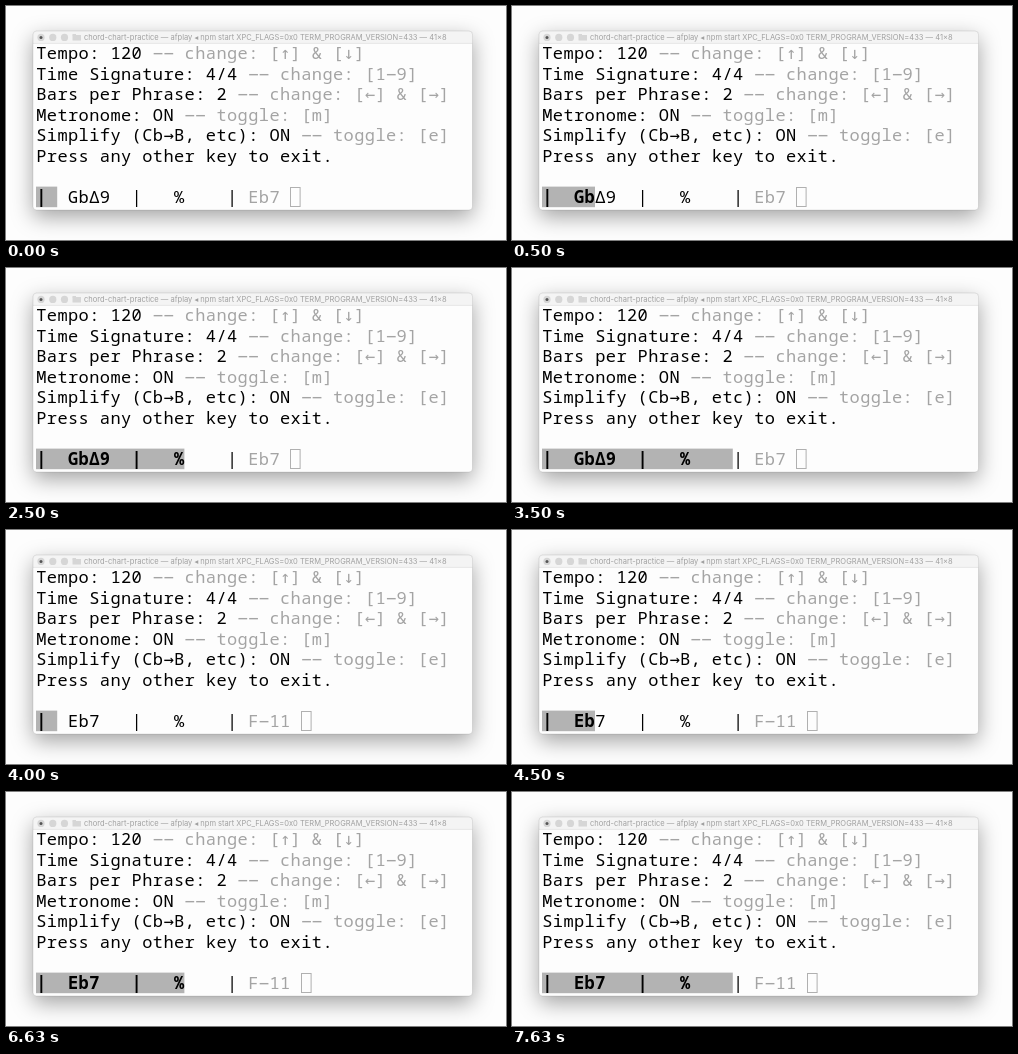
Recreate the animation shown at these times as an HTML page with a canvas. Size 500x234 px, loop 8000 ms.

```html
<!DOCTYPE html>
<html lang="en">
<head>
<meta charset="utf-8">
<title>Chord chart practice</title>
<style>
html, body { margin: 0; width: 100%; height: 100%; overflow: hidden; background: #fdfdfd; }
canvas { display: block; width: 500px; height: 234px; }
</style>
</head>
<body>
<canvas id="stage"></canvas>
<script>
const W = 500, H = 234, LOOP = 8000;
const canvas = document.getElementById('stage');
const ctx = canvas.getContext('2d');
const dpr = window.devicePixelRatio || 1;
canvas.width = W * dpr;
canvas.height = H * dpr;
ctx.scale(dpr, dpr);

const WIN = { x: 27, y: 25, w: 439.5, h: 179 };
const BAR_H = 12.5;
const CELL = 10.6, ROW = 20.6, LEFT = 30, BASE = 53;
const MONO = '17px "Noto Sans Mono", "DejaVu Sans Mono", monospace';
const WIDE = '17px "DejaVu Sans Mono", monospace';
const PAPER = '#fdfdfd', INK = '#000', DIM = '#a4a4a4', MARK = '#b3b3b3';

const menu = [
  ['Tempo: 120', 'change: [↑] & [↓]'],
  ['Time Signature: 4/4', 'change: [1-9]'],
  ['Bars per Phrase: 2', 'change: [←] & [→]'],
  ['Metronome: ON', 'toggle: [m]'],
  ['Simplify (Cb→B, etc): ON', 'toggle: [e]'],
  ['Press any other key to exit.', '']
];

// Each phrase: chord line, upcoming chord, and start time of each beat
const phrases = [
  { line: '|  GbΔ9  |   %    |', next: 'Eb7',
    beats: [0, 500, 1000, 1500, 2000, 2500, 3000, 3500] },
  { line: '|  Eb7   |   %    |', next: 'F-11',
    beats: [4000, 4500, 5000, 5500, 6000, 6630, 7130, 7630] }
];
const markEnds = [2, 5, 7, 9, 11, 14, 16, 18];

function roundBox(x, y, w, h, r) {
  ctx.beginPath();
  ctx.roundRect(x, y, w, h, r);
}

function dot(x, y, r, color) {
  ctx.beginPath();
  ctx.arc(x, y, r, 0, Math.PI * 2);
  ctx.fillStyle = color;
  ctx.fill();
}

// Draws text on the terminal grid, one character per cell;
// arrows and dashes use a font that fills the cell
function put(text, col, row, color, weight = 400) {
  ctx.textAlign = 'center';
  ctx.textBaseline = 'alphabetic';
  ctx.fillStyle = color;
  [...text].forEach((ch, i) => {
    if (ch === ' ') return;
    const wide = '-←↑→↓'.includes(ch);
    ctx.font = wide ? WIDE : weight + ' ' + MONO;
    ctx.fillText(ch === '-' ? '−' : ch, LEFT + (col + i + 0.5) * CELL, BASE + row * ROW);
  });
}

function drawWindow() {
  ctx.fillStyle = PAPER;
  ctx.fillRect(0, 0, W, H);

  ctx.save();
  ctx.shadowColor = 'rgba(0,0,0,0.36)';
  ctx.shadowBlur = 21 * dpr;
  ctx.shadowOffsetY = 7 * dpr;
  roundBox(WIN.x, WIN.y, WIN.w, WIN.h, 3.5);
  ctx.fill();
  ctx.restore();

  roundBox(WIN.x, WIN.y, WIN.w, BAR_H, [3.5, 3.5, 0, 0]);
  ctx.fillStyle = '#f4f4f4';
  ctx.fill();
  ctx.fillStyle = '#dcdcdc';
  ctx.fillRect(WIN.x, WIN.y + BAR_H - 0.6, WIN.w, 0.6);
  roundBox(WIN.x, WIN.y, WIN.w, WIN.h, 3.5);
  ctx.strokeStyle = 'rgba(0,0,0,0.16)';
  ctx.lineWidth = 0.6;
  ctx.stroke();

  for (const x of [35, 46.8, 58.5]) dot(x, 31.4, 3.6, '#d6d6d6');
  dot(35, 31.4, 1.5, '#555');

  // Folder
  ctx.fillStyle = '#d6d6d6';
  ctx.fillRect(66.5, 28, 3.5, 1.5);
  ctx.fillRect(66.5, 29, 8.5, 5.5);

  ctx.font = '7.54px Inter, "Open Sans", sans-serif';
  ctx.textAlign = 'left';
  ctx.textBaseline = 'alphabetic';
  ctx.fillStyle = '#a0a0a0';
  ctx.fillText('chord-chart-practice — afplay ◂ npm start XPC_FLAGS=0x0 TERM_PROGRAM_VERSION=433 — 41×8', 78, 34.3);
}

function drawMenu() {
  menu.forEach(([label, hint], row) => {
    put(label, 0, row, INK, 500);
    if (hint) put('-- ' + hint, label.length + 1, row, DIM, 500);
  });
}

function drawChart(t) {
  const { line, next, beats } = phrases[t < 4000 ? 0 : 1];
  const end = markEnds[beats.filter(b => b <= t).length - 1];
  const chars = [...line];

  ctx.fillStyle = MARK;
  ctx.fillRect(LEFT, 180.6, end * CELL, 20.6);
  put(chars.slice(0, end).join(''), 0, 7, INK, 700);
  put(chars.slice(end).join(''), end, 7, INK);
  put(next, 20, 7, DIM);

  const cursor = Math.floor(LEFT + (21 + next.length) * CELL) + 0.5;
  ctx.strokeStyle = '#b0b0b0';
  ctx.lineWidth = 1;
  ctx.strokeRect(cursor, 181.5, 9.6, 19);
}

const start = performance.now();

function frame(now) {
  const t = Math.max(0, now - start) % LOOP;
  drawWindow();
  drawMenu();
  drawChart(t);
  requestAnimationFrame(frame);
}

frame(start);
</script>
</body>
</html>
```
